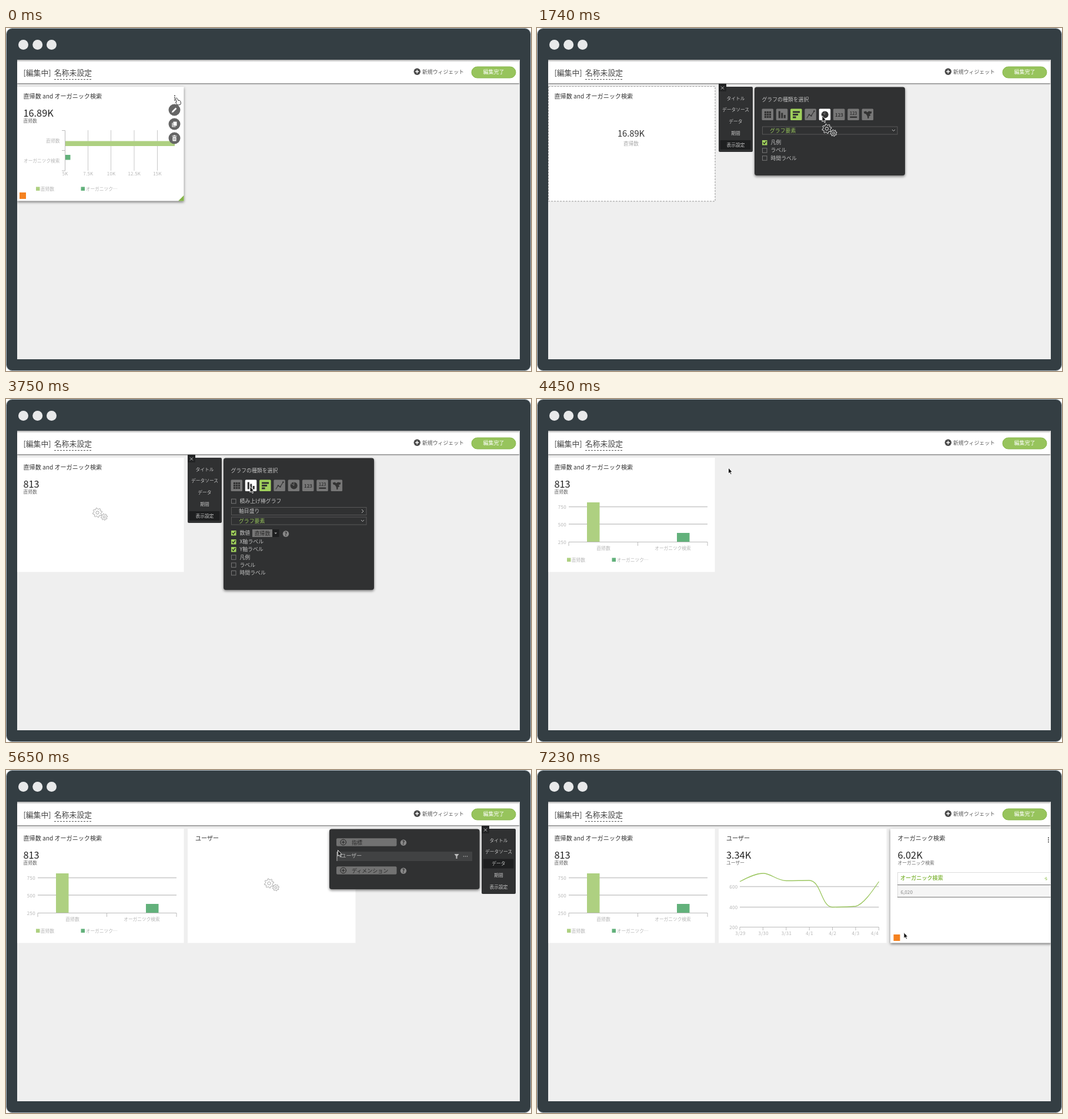
Write an HTML page that moves like this. It is 893 by 584 pixels and loops after 7.46 s.

```html
<!DOCTYPE html>
<html lang="ja">
<meta charset="utf-8">
<title>ダッシュボード編集</title>
<style>
  html, body { margin: 0; width: 100%; height: 100%; overflow: hidden; background: #fff }
  svg { display: block; width: 893px; height: 584px; font-family: "Noto Sans CJK JP", "Noto Sans CJK", "Noto Sans", sans-serif }
  .mid { text-anchor: middle }
  .end { text-anchor: end }
  .num { letter-spacing: .3px }
  .header { filter: drop-shadow(0 1px 1px rgba(0,0,0,.6)) }
  .lift { filter: drop-shadow(0 2px 2px rgba(0,0,0,.5)) }
</style>
<svg viewBox="0 0 893 584">
  <defs>
    <clipPath id="view"><path d="M19 54H873.5V564H19Z"/></clipPath>
    <linearGradient id="edge" x2="0" y2="1"><stop stop-color="#aaa"/><stop offset="1" stop-color="#fff"/></linearGradient>
  </defs>
  <rect x=".5" y=".5" width="892" height="583" rx="10" fill="#343e43" stroke="#b4c0c8"/>
  <g fill="#e8e9ea"><circle cx="29.5" cy="28.5" r="8.5"/><circle cx="53.7" cy="28.5" r="8.5"/><circle cx="77.5" cy="28.5" r="8.5"/></g>
  <rect x="19" y="54" width="855" height="510" fill="#efefef"/>
  <g id="scene" clip-path="url(#view)"></g>
</svg>
<script>
const LIGHT = '#aed081', DEEP = '#62b17b', GREEN = '#97c45c', AXIS = '#c8c8c8', PALE = '#b5b5b5', DARK = '#303132';

// Drawing helpers: each returns SVG markup
const T = (x, y, s, size = 8.9, fill = '#c0c0c0', attr = '') =>
  `<text x="${x}" y="${y}" font-size="${size}" fill="${fill}" ${attr}>${s}</text>`;
const R = (x, y, w, h, fill, attr = '') =>
  `<rect x="${x}" y="${y}" width="${w}" height="${h}" fill="${fill}" ${attr}/>`;
const C = (x, y, r, fill, attr = '') => `<circle cx="${x}" cy="${y}" r="${r}" fill="${fill}" ${attr}/>`;
const L = (d, stroke, width = 1, attr = '') =>
  `<path d="${d}" fill="none" stroke="${stroke}" stroke-width="${width}" ${attr}/>`;
const F = (d, fill, attr = '') => `<path d="${d}" fill="${fill}" ${attr}/>`;
const G = (x, y, body, attr = '') => `<g transform="translate(${x} ${y})" ${attr}>${body}</g>`;
const MID = 'class="mid"', END = 'class="end"', NUM = 'class="mid num"', NUM_END = 'class="end num"';

function gear(x, y, r, color) {
  const pts = Array.from({ length: 32 }, (_, i) => {
    const a = (i + .5) * Math.PI / 16, q = i & 2 ? r : r * .74;
    return `${(x + q * Math.cos(a)).toFixed(1)},${(y + q * Math.sin(a)).toFixed(1)}`;
  });
  return `<polygon points="${pts.join(' ')}" fill="none" stroke="${color}"/>` +
    C(x, y, r * .33, 'none', `stroke="${color}"`);
}
const gears = (x, y, color = '#a5a5a5') => gear(x, y, 8, color) + gear(x + 11.5, y + 7.3, 5.5, color);

const arrow = (x, y) => G(x, y, F('M0 0V10L2.3 8.1L4 11.6L5.6 10.8L4 7.4H6.8Z', '#111', 'stroke="#fff" stroke-width=".9"'));
const hand = (x, y) => G(x, y, F('M2 .8C3 .3 3.8 1 4.2 2L5.4 5C7 4.4 8.4 4.8 9.2 6L10 9.5L9 12L4.5 12.6L1 8.8C.6 7.8 1.6 7.4 2.6 8L1.2 2.4C1 1.6 1.4 1 2 .8Z',
  '#fff', 'stroke="#222" stroke-width=".9"'));

const header = `<g class="header">${R(19, 55, 854.5, 39, '#fff')}</g>` + R(19, 54, 854.5, 4, 'url(#edge)') +
  T(29.5, 81, '[編集中]', 12.8, '#444') + T(82, 81, '名称未設定', 12.8, '#444') +
  L('M82 87.5H146', '#555', 1, 'stroke-dasharray="3 2"') +
  C(699.3, 74.3, 5.7, '#4a4a4a') + L('M696.3 74.3H702.3M699.3 71.3V77.3', '#fff', 1.5) +
  T(708, 78, '新規ウィジェット', 8.9, '#555') +
  R(792, 66, 75, 19, GREEN, 'rx="9.5" stroke="#84b548"') + T(829.5, 78.3, '編集完了', 9, '#fff', MID);

// Widgets
const sheet = (x, w, hover) => R(x, 100, w, 194.5, '#fff', hover ? 'class="lift"' : '');
const dashed = L('M19.5 99.5H303V295H19.5Z', '#999', 1, 'stroke-dasharray="3 2"');
const title = (x, s) => T(x, 119.5, s, 10.1, '#333');
const total = (x, n, s) => T(x, 151, n, 16.3, '#222') + T(x, 161, s, 7.8, '#666');
const middle = T(160, 185, '16.89K', 14.7, '#333', MID) + T(160, 200, '直帰数', 8.6, '#aaa', MID);
const dots = x => [115.5, 119, 122.5].map(y => C(x, y, 1, '#333')).join('');
const badge = x => R(x, 280, 11, 11, '#f58220');
const key = R(51, 270.5, 6.5, 6.5, LIGHT) + T(58.7, 277, '直帰数', 7.8, PALE) +
  R(127.5, 270.5, 6.5, 6.5, DEEP) + T(135.7, 277, 'オーガニツク…', 7.7, PALE);

const card1 = (body, hover) => sheet(19, 283.5, hover) + title(29.5, '直帰数 and オーガニック検索') + body;

const rows = (labels, end1, end2) => {
  const ticks = labels.map((s, i) => T(100.7 + 39.2 * i, 251, s, 7.8, PALE, NUM)).join('');
  return L('M139.5 174V243M178.5 174V243M218 174V243M257.5 174V243', AXIS) +
    R(100.5, 192.5, end1 - 100.5, 8.5, LIGHT) + R(100.5, 216, end2 - 100.5, 8.5, DEEP) +
    L('M95 174.5H100.5V243H95M95 208.5H100.5', '#bbb') + ticks +
    T(91.5, 195, '直帰数', 7.8, PALE, END) + T(91.5, 229, 'オーガニツク検索', 7.7, PALE, END) + key;
};
const rowsBig = total(29.5, '16.89K', '直帰数') + rows(['5K', '7.5K', '10K', '12.5K', '15K'], 287, 109.5);
const rowsSmall = total(29.5, '813', '直帰数') + rows(['250', '400', '550', '700', '850'], 247, 134);
const columns = total(29.5, '813', '直帰数') + L('M54 183.5H290M54 213H290', AXIS, 1.4) +
  R(85, 176, 21.5, 67, LIGHT) + R(238, 228, 21.5, 15, DEEP) +
  L('M54 250V243.5H290V250M171.5 243.5V250', '#bbb') +
  [750, 500, 250].map((n, i) => T(50, 186.5 + 30 * i, n, 8, PALE, NUM_END)).join('') +
  T(113, 257, '直帰数', 7.8, PALE, MID) + T(231, 257, 'オーガニツク検索', 7.7, PALE, MID) + key;
const ring = C(160, 180, 52, 'none', `stroke="${LIGHT}" stroke-width="13"`) +
  L('M160 128A52 52 0 0 1 176 130.5', DEEP, 13) + middle + key;

const pencil = L('M-3.5 3.5L3 -3', '#fff', 2.6) + L('M-4.5 4.5L-3 3', '#fff');
const copy = R(-2, -4, 6, 7, '#fff') + L('M-3.5 -2V4.5H2', '#fff', 1.2);
const trash = R(-3, -2, 6, 7, '#fff') + L('M-4 -3.5H4M-1.5 -4.5H1.5', '#fff', 1.2) + L('M-1 -.5V3.5M1 -.5V3.5', '#666', .8);
const tools = [pencil, copy, trash].map((icon, i) => G(286.5, 139.5 + 24 * i, C(0, 0, 10, '#666') + icon)).join('');
const tip = (i, s) => {
  const w = s.length * 8 + 6, y = 131 + 24 * i;
  return R(271 - w, y, w, 17, '#555', 'rx="2"') + T(271 - w / 2, y + 11.5, s, 8, '#fff', MID);
};
const hovered = card1(rowsBig + badge(23) + F('M302.5 285V294.5H293Z', '#84b548') + tools + dots(287), true);

const card2 = body => sheet(309, 285.5) + body;
const users = title(322, 'ユーザー');
const line = users + total(322, '3.34K', 'ユーザー') + L('M345 198.5H581.5M345 233.5H581.5', AXIS, 1.4) +
  L('M345 273V267.5H581.5V273' + [1, 2, 3, 4, 5].map(i => `M${345 + 39.4 * i} 267.5V273`).join(''), '#bbb') +
  [600, 400, 200].map((n, i) => T(341.5, 201.7 + 34.8 * i, n, 8, PALE, NUM_END)).join('') +
  ['3/29', '3/30', '3/31', '4/1', '4/2', '4/3', '4/4'].map((s, i) => T(i < 6 ? 346 + 39.2 * i : 574.5, 281, s, 7.9, PALE, NUM)).join('') +
  L('M345 190C358 183 372 176 385 176S408 188.5 424 188.5S450 188 463 188C483 188 484 233.5 502 233.5S529 233.5 542 232C555 229 570 207 581.5 190', '#9bc65f', 1.3);

const card3 = (body, hover) => sheet(601, 290, hover) + body;
const table = title(613.5, 'オーガニック検索') + total(613.5, '6.02K', 'オーガニック検索') +
  R(613.5, 174.5, 280, 21, '#fff', 'stroke="#ddd"') + R(613.5, 196, 280, 20.5, '#f5f5f5', 'stroke="#ddd"') +
  L('M613 195.5H880M613 216.5H880', '#777') + T(618, 187.3, 'オーガニック検索', 9.1, '#8fbe50', 'font-weight="bold"') +
  T(618.5, 210.5, '6,020', 8.2, '#888') + L('M866 182V187.5L868 185.5M863.5 184.5H865', GREEN) + badge(606.5) + dots(870);

// Settings panels
const menu = (dx, current) => G(dx, 0, F('M309 96Q309 95 310 95H321Q322 95 322 96V100H365Q367 100 367 102V209Q367 211 365 211H311Q309 211 309 209Z', DARK) +
  R(309, 95, 13, 13, '#232425', 'rx="1"') + L('M313 99.5L318 104.5M318 99.5L313 104.5', '#ccc', .9) +
  R(311.5, 191 - 19.8 * (4 - current), 52, 16, '#1e1f20', 'rx="1"') +
  ['タイトル', 'データソース', 'データ', '期間', '表示設定'].map((s, i) => T(338, 122.5 + 19.8 * i, s, 7.75, '#c4c4c4', MID)).join(''));
const box = bottom => R(370, 100.5, 256, bottom - 100.5, DARK, 'rx="4" class="lift"');
const check = (y, s, on) => (on ? R(383, y - 4, 8.5, 8.5, '#a0d15c') + L(`M384.7 ${y}L386.8 ${y + 2.3}L390 ${y - 2.4}`, '#222', 1.3)
  : R(383.5, y - 3.5, 7.5, 7.5, 'none', 'stroke="#777"')) + T(397.5, y + 3.2, s);
const fold = (y, s, open) => R(383.5, y + .5, 229.5, 13, 'none', 'stroke="#585858"') + T(396, y + 10.2, s, 8.9, open ? '#97c45c' : '#c0c0c0') +
  L(open ? `M604 ${y + 5.5}L606.5 ${y + 8}L609 ${y + 5.5}` : `M605 ${y + 4}L608 ${y + 7}L605 ${y + 10}`, '#bbb');
const help = (x, y) => C(x, y, 5.2, '#888') + T(x, y + 3.1, '?', 8.5, '#222', 'class="mid" font-weight="bold"');

const ink = '#333';
const icons = [
  [0, 1, 2].map(i => [0, 1, 2].map(j => R(4.3 + 4 * i, 4.3 + 4 * j, 3.3, 3.3, ink)).join('')).join(''),
  R(4, 4, 3, 12, ink) + R(8.5, 7, 3, 9, ink) + R(13, 10.5, 3, 5.5, ink),
  R(4, 4, 12, 3, ink) + R(4, 8.5, 9, 3, ink) + R(4, 13, 5.5, 3, ink),
  L('M3.5 16L7.5 10L11 12L16 4', ink, 1.2) + C(7.5, 10, 1.3, ink) + C(11, 12, 1.3, ink) + C(16, 4, 1.3, ink),
  C(10, 10, 6, ink) + L('M10 10V4M10 10L5.5 6.5', '#888', .8),
  T(10, 13, '123', 7.8, ink, 'class="mid" font-weight="bold"'),
  T(10, 10.5, '123', 7, ink, 'class="mid" font-weight="bold"') + R(4, 13, 12, 2.5, ink),
  F('M3 5L7 4L9 6L12 4L17 5L16 8L13 9L15 11L12 13L12 16L10 17L9 12L7 9L4 8Z', ink)
];
const chooser = (sel, over) => T(382.5, 124.5, 'グラフの種類を選択') + icons.map((body, i) => G(382.5 + 24.3 * i, 137.5,
  R(0, 0, 19.5, 19.5, i === over ? '#fff' : i === sel ? '#a0d15c' : '#777', 'rx="1.5"') + body)).join('');
const piePanel = (sel, over) => menu(0, 4) + box(251) + chooser(sel, over) + fold(167.5, 'グラフ要素', true) +
  check(195, '凡例', true) + check(208.2, 'ラベル') + check(221.3, '時間ラベル');
const barBody = (sel, over) => box(325) + chooser(sel, over) + check(173.8, '積み上げ棒グラフ') +
  fold(184, '軸目盛り') + fold(200.5, 'グラフ要素', true) +
  check(228, '数値', true) + R(419, 222, 34, 13, '#777') + T(436, 231.7, '直帰数', 8.9, '#2a2a2a', MID) +
  R(453, 222, 11.5, 13, '#1e1f20') + F('M456.5 227.5H461L458.7 230Z', '#aaa') + help(476, 229.5) +
  check(243, 'X軸ラベル', true) + check(256, 'Y軸ラベル', true) + check(269.3, '凡例') + check(282.5, 'ラベル') + check(296, '時間ラベル');
const barPanel = (sel, over) => menu(0, 4) + barBody(sel, over);

const pill = (y, s) => R(562, y - 7, 102.5, 13.5, '#727272', 'rx="2"') + C(573.7, y - .3, 4.8, 'none', 'stroke="#222"') +
  L(`M571 ${y - .3}H576.4M573.7 ${y - 3}V${y + 2.4}`, '#222') + T(588, y + 3.2, s, 9, '#2a2a2a') + help(676, y + .3);
const dataBody = s => R(550, 100.5, 255.5, 102.5, DARK, 'rx="4" class="lift"') + pill(123.3, '指標') +
  (s ? R(562, 139, 231, 16, '#414243') + R(562, 139, 2, 16, '#777') + T(569.5, 148.7, s, 9, '#b5b5b5') +
    F('M762.5 143H770.5L767.5 147V151H765.5V147Z', '#bbb') + [778.5, 781.5, 784.5].map(x => C(x, 147, .8, '#bbb')).join('') : '') +
  pill(s ? 171.3 : 147.5, 'ディメンション');
const dataPanel = s => menu(500, 2) + dataBody(s);
const linePanel = sel => menu(500, 4) + G(180, 0, barBody(sel));
const leftPanel = s => menu(228, 2) + G(-273, 0, dataBody(s));

// Time line: start in ms, then the layers above the header
const loading = gears(155.5, 193.5), waiting = card1(middle + dashed);
const columnCard = card1(columns), both = columnCard + card2(line);
const blank = title(322, '新規ウィジェット');
const steps = [
  [0, hovered, hand(287.5, 118.5)],
  [170, hovered, tip(0, 'ウィジェットを編集'), hand(287.5, 143)],
  [500, hovered, tip(1, 'ウィジェットをコピー'), hand(286, 160)],
  [870, hovered, tip(2, 'ウィジェットを削除'), hand(286, 184)],
  [1140, card1(rowsBig), barPanel(2), arrow(378, 181)],
  [1440, card1(rowsBig), barPanel(2, 4), arrow(485, 149.5)],
  [1590, waiting, barPanel(2, 4), arrow(485, 149.5)],
  [1740, waiting, piePanel(2, 4), arrow(485, 149.5), gears(493, 171.5, '#eee')],
  [2010, card1(ring), piePanel(4), arrow(485, 149.5)],
  [2380, card1(ring), piePanel(4), arrow(822, 79)],
  [2650, waiting, piePanel(4), arrow(822, 79)],
  [2920, card1(total(29.5, '813', '直帰数') + loading), barPanel(2), arrow(378, 181)],
  [3250, card1(rowsSmall), barPanel(2), arrow(378, 181)],
  [3480, card1(rowsSmall), barPanel(2), arrow(394, 163)],
  [3750, card1(total(29.5, '813', '直帰数') + loading), barPanel(2, 1), arrow(415, 149)],
  [4020, columnCard, barPanel(1), arrow(415, 149)],
  [4220, columnCard, arrow(318, 101)],
  [4450, columnCard, arrow(325.5, 117)],
  [4680, columnCard, arrow(560, 96)],
  [4910, columnCard, hand(735, 76)],
  [5110, columnCard, card2(blank), dataPanel(), arrow(704, 94)],
  [5280, columnCard, card2(blank), dataPanel(), arrow(640, 110)],
  [5460, columnCard, card2(blank), dataPanel(), arrow(574, 122)],
  [5650, columnCard, card2(users + gears(447.5, 193)), dataPanel('ユーザー'), arrow(564.5, 136.5)],
  [5880, columnCard, card2(users + total(322, '3.34K', 'ユーザー')), linePanel(0), arrow(645, 149)],
  [6000, columnCard, card2(users + gears(447.5, 193)), linePanel(3), arrow(645, 149)],
  [6120, both, linePanel(3), arrow(645, 149)],
  [6390, both, arrow(704, 94)],
  [6650, both, card3(title(613.5, '新規ウィジェット')), leftPanel(), arrow(300, 122)],
  [6890, both, card3(title(613.5, 'オーガニック検索') + gears(737, 193)), leftPanel('オーガニック検索'), arrow(292, 137)],
  [7160, both, card3(table, true), arrow(612, 262)],
  [7230, both, card3(table, true), arrow(624, 276.5)]
];

const scene = document.getElementById('scene'), start = performance.now();
let shown = -1;
function draw(now) {
  const t = Math.max(0, now - start) % 7460;
  const i = steps.findLastIndex(s => s[0] <= t);
  if (i !== shown) scene.innerHTML = header + steps[shown = i].slice(1).join('');
  requestAnimationFrame(draw);
}
draw(start);
</script>
</html>
```
